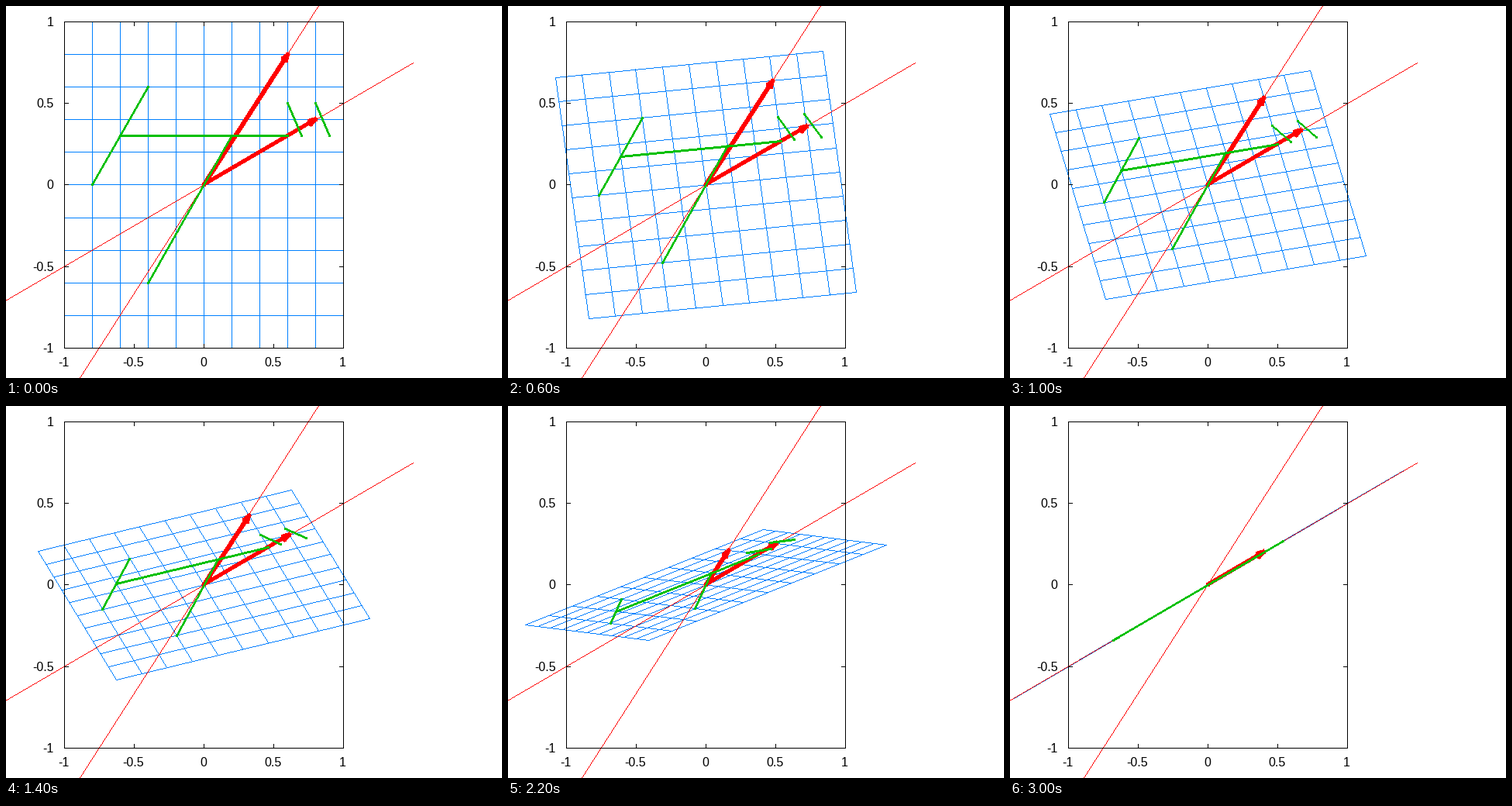
Recreate the animation shown at these times as a matplotlib script. Size 640 by 480 pixels, loop 3100 ms.

```python
import numpy as np
import matplotlib.pyplot as plt
from matplotlib.animation import FuncAnimation
from matplotlib.collections import PolyCollection

W, H, DPI = 640, 480, 100
FRAMES, INTERVAL = 31, 100

BLUE, RED, GREEN = "#0080ff", "#ff0000", "#00c000"

# Projection onto (2, 1) along (3, 4), scaled by one half
END = np.array([[0.8, -0.6], [0.4, -0.3]])
VECTORS = [(0.6, 0.8), (0.8, 0.4)]
STROKES = [
    ((-0.8, 0), (-0.4, 0.6)),
    ((-0.6, 0.3), (0.6, 0.3)),
    ((-0.4, -0.6), (0.2, 0.3)),
    ((0.6, 0.5), (0.7, 0.3)),
    ((0.8, 0.5), (0.9, 0.3)),
]
STEPS = np.arange(-5, 6) / 5

fig = plt.figure(figsize=(W / DPI, H / DPI), dpi=DPI, facecolor="white")
ax = fig.add_axes([0, 0, 1, 1])
ax.set_xlim(0, W)
ax.set_ylim(H, 0)
ax.axis("off")


def to_pixel(p):
    """Column and row of the pixel that holds a point in plot units."""
    x, y = 255 + 180 * p[0], 230.5 - 210.5 * p[1]
    return np.ceil(np.round([x - 0.5, y - 0.5], 6))


def stroke(a, b, width=1):
    """Outline of a line stepped pixel by pixel along its longer axis."""
    a, b = np.asarray(a, float), np.asarray(b, float)
    d = b - a
    major = 0 if abs(d[0]) >= abs(d[1]) else 1
    if d[major] < 0:
        a, d = b, -d
    n = int(d[major])
    steps = np.arange(n + 1)
    span = int(width * np.hypot(*d) / n) if n else width
    low = np.floor(a[1 - major] + d[1 - major] * steps / max(n, 1) + 0.5) - span // 2
    u = np.repeat(a[major] + steps, 2) + np.tile([0, 1], n + 1)
    v = np.repeat(low, 2)
    outline = np.column_stack([np.r_[u, u[::-1]], np.r_[v, v[::-1] + span]])
    return outline if major == 0 else outline[:, ::-1]


def disc(p, width):
    angle = np.linspace(0, 2 * np.pi, 24, endpoint=False)
    ring = np.column_stack([np.cos(angle), np.sin(angle)])
    return np.asarray(p) + 0.5 + ring * (width - 1) / 2


def thick(a, b, width):
    """A stroke with round ends."""
    return [stroke(a, b, width), disc(a, width), disc(b, width)]


def arrow(tail, tip, width=6, size=8, spread=np.radians(15)):
    parts = thick(tail, tip, width)
    d = tail - tip
    if d.any():
        for turn in (-spread, spread):
            angle = np.arctan2(d[1], d[0]) + turn
            back = np.round(tip + size * np.array([np.cos(angle), np.sin(angle)]))
            parts += thick(tip, back, width)
    return parts


def layer(color, z, outlines=()):
    shapes = PolyCollection(list(outlines), facecolors=color, edgecolors="none",
                            linewidths=0, antialiaseds=False, zorder=z)
    return ax.add_collection(shapes, autolim=False)


def draw_axes():
    left, right, top, bottom = 75, 435, 20, 441
    lines = [((left, top), (right, top)), ((left, bottom), (right, bottom)),
             ((left, top), (left, bottom)), ((right, top), (right, bottom))]
    font = dict(family="Liberation Sans", size=16 * 72 / DPI, color="black",
                va="baseline")
    for v in (-1, -0.5, 0, 0.5, 1):
        x, y = to_pixel((v, v))
        lines += [((x, top), (x, top + 5)), ((x, bottom), (x, bottom - 5)),
                  ((left, y), (left + 5, y)), ((right, y), (right - 5, y))]
        ax.text(x - 0.5, 465, f"{v:g}", ha="center", **font)
        ax.text(61.5, y + 6, f"{v:g}", ha="right", **font)
    layer("black", 5, [stroke(a, b) for a, b in lines])


draw_axes()
grid = layer(BLUE, 1)
layer(RED, 2, [stroke(to_pixel((-1.5, -1.5 * m)), to_pixel((1.5, 1.5 * m)))
               for m in (1 / 2, 4 / 3)])
arrows = layer(RED, 3)
letters = layer(GREEN, 4)


def update(i):
    t = i / (FRAMES - 1)
    m = (1 - t) * np.eye(2) + t * END

    def at(*p):
        return to_pixel(m @ np.array(p))

    grid.set_verts([stroke(at(-1, s), at(1, s)) for s in STEPS]
                   + [stroke(at(s, -1), at(s, 1)) for s in STEPS])
    arrows.set_verts([part for v in VECTORS for part in arrow(at(0, 0), at(*v))])
    letters.set_verts([part for a, b in STROKES for part in thick(at(*a), at(*b), 3)])
    return grid, arrows, letters


anim = FuncAnimation(fig, update, frames=FRAMES, interval=INTERVAL,
                     repeat=True, repeat_delay=0, blit=False)
plt.show()
```
